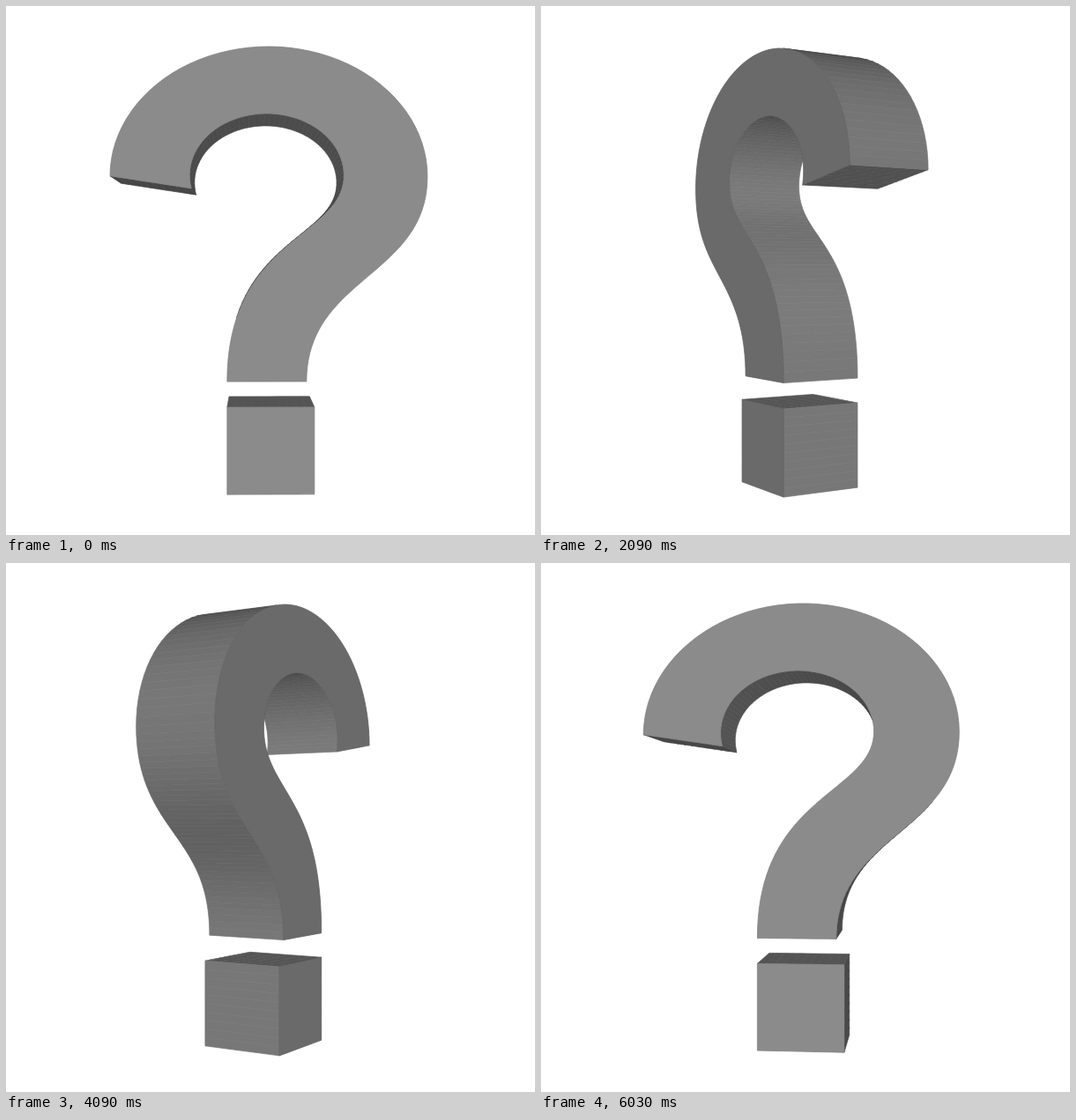
An HTML page with a canvas for the animation above (6090 ms loop, 600 px wide and 600 px high).

```html
<!DOCTYPE html>
<html lang="en">
<head>
<meta charset="utf-8">
<title>Turning question mark</title>
<style>
html, body { margin: 0; width: 100%; height: 100%; overflow: hidden; background: #fff; }
canvas { display: block; }
</style>
</head>
<body>
<canvas id="stage" width="600" height="600"></canvas>
<script>
const ctx = document.getElementById('stage').getContext('2d');
const LOOP = 6090, FRAMES = 152, RAD = Math.PI / 180;
const CAMERA = 1180, HALF = 48, AXIS_X = 295, MID_Y = 300;
const FRONT = CAMERA / (CAMERA - HALF);

// Each helper samples one edge of the front face, leaving out its end point.
const sample = (count, f) => Array.from({ length: count }, (_, i) => f(i / count));
const arc = (cx, cy, rx, ry, from, to) => sample(48, t => {
  const a = (from + (to - from) * t) * RAD;
  return [cx + rx * Math.cos(a), cy + ry * Math.sin(a)];
});
const line = ([x0, y0], [x1, y1]) => sample(10, t => [x0 + (x1 - x0) * t, y0 + (y1 - y0) * t]);
// S-curve that is vertical at both ends; both handles reach the height of the bend.
const sway = ([x0, y0], [x1, y1], bend) => sample(40, t => {
  const u = 1 - t;
  return [
    x0 + (x1 - x0) * t * t * (3 - 2 * t),
    u * u * u * y0 + 3 * t * u * bend + t * t * t * y1
  ];
});

const TIP = [118.5, 193], SHOULDER = [478.5, 193], INNER = [383.5, 192];
const FOOT_RIGHT = [341, 426], FOOT_LEFT = [251, 426], HOOK_END = [210.4, 207];
const hook = [
  ...arc(298.5, 193, 180, 147, 180, 360),
  ...sway(SHOULDER, FOOT_RIGHT, 307),
  ...line(FOOT_RIGHT, FOOT_LEFT),
  ...sway(FOOT_LEFT, INNER, 262),
  ...arc(296, 192, 87.5, 70, 0, -191),
  ...line(HOOK_END, TIP)
];
const corner = k => [300.5 + 70 * Math.cos(k * 90 * RAD - 135 * RAD),
                     504.5 + 70 * Math.sin(k * 90 * RAD - 135 * RAD)];
const dot = [0, 1, 2, 3].flatMap(k => line(corner(k), corner(k + 1)));

const shapes = [hook, dot].map(points => points.map(([x, y]) => (
  { x: (x - AXIS_X) / FRONT - 0.8, y: (y - MID_Y) / FRONT }
)));
const walls = shapes.flatMap(points => points.map((p, i) => {
  const q = points[(i + 1) % points.length];
  const length = Math.hypot(q.x - p.x, q.y - p.y);
  return {
    p, q,
    x: (p.x + q.x) / 2, y: (p.y + q.y) / 2,
    nx: (q.y - p.y) / length, ny: (p.x - q.x) / length
  };
}));

const gray = v => `rgb(${v},${v},${v})`;

function draw(angle) {
  const sin = Math.sin(angle), cos = Math.cos(angle);
  const camX = -CAMERA * sin, camZ = CAMERA * cos;

  const project = (p, z) => {
    const scale = CAMERA / (CAMERA + p.x * sin - z * cos);
    return [AXIS_X + scale * (p.x * cos + z * sin), MID_Y + scale * p.y];
  };
  const polygon = (points, fill, edge, width) => {
    ctx.beginPath();
    points.forEach(p => ctx.lineTo(...p));
    ctx.closePath();
    ctx.fillStyle = fill;
    ctx.strokeStyle = edge;
    ctx.lineWidth = width;
    ctx.fill();
    ctx.stroke();
  };

  ctx.fillStyle = '#fff';
  ctx.fillRect(0, 0, 600, 600);
  ctx.lineJoin = 'round';

  for (const w of walls) {
    const dx = camX - w.x, dy = -w.y;
    w.distance = Math.hypot(dx, dy);
    w.facing = (dx * w.nx + dy * w.ny) / Math.hypot(dx, dy, camZ);
  }
  walls.filter(w => w.facing > 0)
    .sort((a, b) => b.distance - a.distance)
    .forEach(({ p, q, facing, ny }) => {
      // Light comes from the viewer and a little from above.
      const color = gray(Math.round(60 + (66 - 16 * ny) * facing ** 0.6));
      polygon([project(p, HALF), project(q, HALF), project(q, -HALF), project(p, -HALF)],
        color, color, 0.7);
    });

  // The nearer cap is never covered by the walls.
  if (Math.abs(camZ) > HALF) {
    const z = Math.sign(camZ) * HALF;
    const shade = Math.round(70 + 69 * Math.abs(cos));
    for (const points of shapes) {
      polygon(points.map(p => project(p, z)), gray(shade), gray(shade - 8), 0.8);
    }
  }
}

// The turn lags slightly while the sign is seen from the side.
function angleAt(time) {
  const step = Math.floor(time / LOOP * FRAMES);
  const turn = 0.8 + 2.355 * step;
  return (turn - 1.4 * (1 - Math.cos(2 * turn * RAD))) * RAD;
}

const start = performance.now();
function tick() {
  draw(angleAt((performance.now() - start) % LOOP));
  requestAnimationFrame(tick);
}
tick();
</script>
</body>
</html>
```
